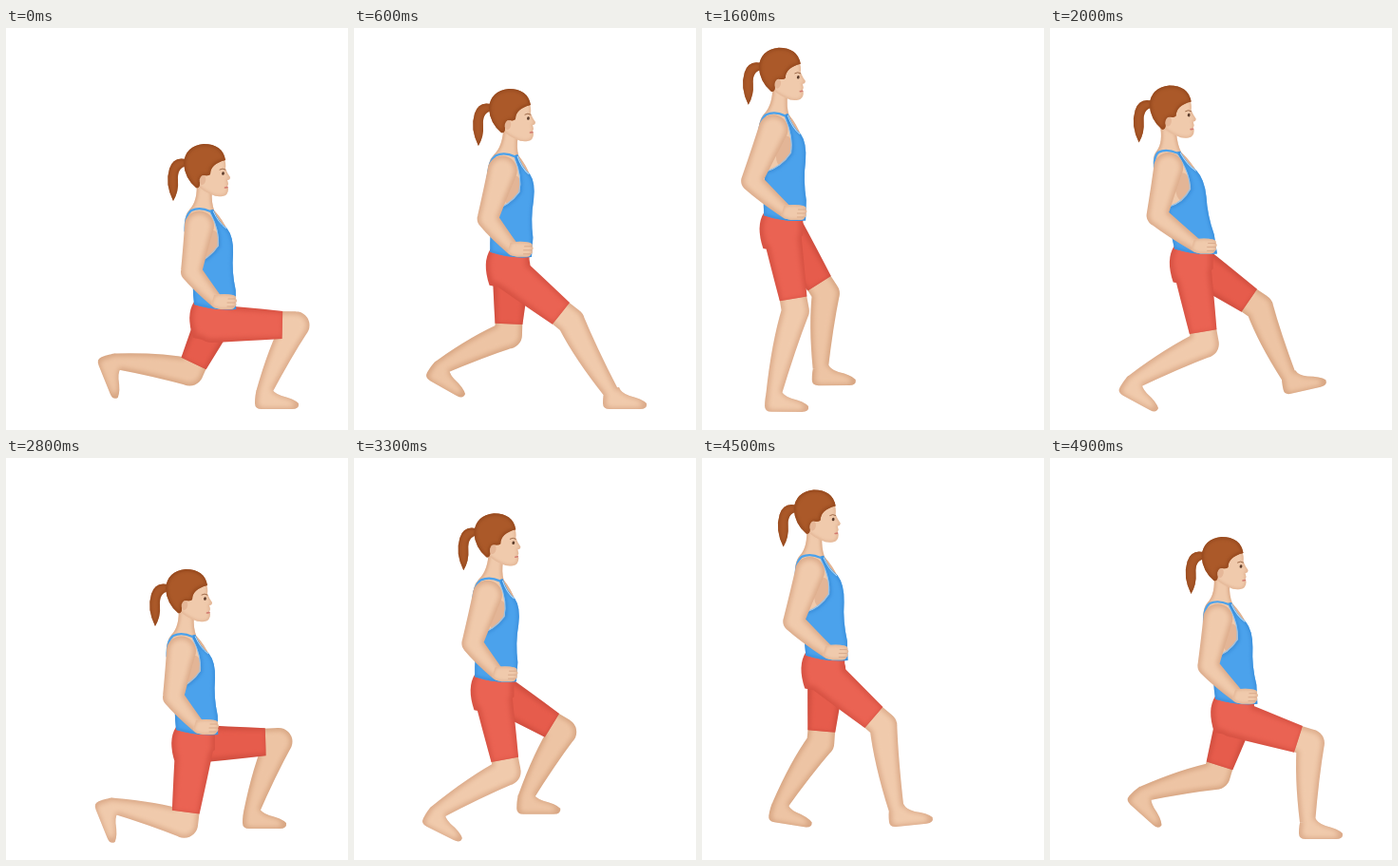
These frames come from a looping animation (360x423 px, 5 s). An HTML page with a canvas:

```html
<!DOCTYPE html>
<html lang="en">
<head>
<meta charset="utf-8">
<title>Alternating lunges</title>
<style>
html, body { margin: 0; width: 100%; height: 100%; overflow: hidden; background: #fff; }
canvas { display: block; width: 360px; height: 423px; }
</style>
</head>
<body>
<canvas id="stage"></canvas>
<script>
const LOOP = 5000, STEP = 100, WIDTH = 360, HEIGHT = 423;
const canvas = document.getElementById('stage');
const ratio = window.devicePixelRatio || 1;
canvas.width = WIDTH * ratio;
canvas.height = HEIGHT * ratio;
const ctx = canvas.getContext('2d');

const SKIN = ['#f0caac', '#dcab8a'], FAR_SKIN = ['#edc4a4', '#d8a683'];
const RED = ['#ea6353', '#d75243'], FAR_RED = ['#e65c4c', '#cf4d3e'];
const BLUE = ['#4ba2ec', '#3c90dc'], HAIR = ['#ab5929', '#96491e'];

const STAND = [80, 20];
const TOES = { near: [109, 403], far: [112, 388] };

// Each lunge: times of step, sink, push-off and rise, and where it ends up
const LUNGES = [
  { lead: 'far', out: [1360, 2080], back: [3050, 3600],
    dropX: [1550, 2560], dropY: [1550, 2560], riseX: [2900, 3850], riseY: [2900, 3600],
    deep: [189, 117], plant: [258, 373], lean: 19 },
  { lead: 'near', out: [4000, 4820], back: [650, 1130],
    dropX: [4080, 5250], dropY: [4240, 5380], riseX: [0, 1500], riseY: [0, 1100],
    deep: [208, 122], plant: [271, 384], lean: 7 }
];

const phase = (t, [a, b]) => Math.min(1, Math.max(0, (t - a) / (b - a)));
const ease = (t, span) => { const p = phase(t, span); return p * p * (3 - 2 * p); };
const lerp = (a, b, f) => a + (b - a) * f;
const mix = (a, b, f) => [lerp(a[0], b[0], f), lerp(a[1], b[1], f)];

// 0 to 1 and back; a lunge that spans the loop point begins at 1
const amount = (t, up, down) => (down[0] < up[0] ? 1 : 0) + ease(t, up) - ease(t, down);

function leadFoot(lunge, t) {
  const [x, y] = TOES[lunge.lead], going = phase(t, lunge.out), coming = phase(t, lunge.back);
  const [ax, ay] = mix([x - 34, y - 16], lunge.plant, amount(t, lunge.out, lunge.back));
  const lift = Math.sin(Math.PI * going) + Math.sin(Math.PI * coming);
  return { ankle: [ax, ay - 15 * lift], angle: -14 * Math.sin(Math.PI * going ** 4) };
}

// The rear foot rolls up over its planted toes
function rearFoot([x, y], angle) {
  const a = angle * Math.PI / 180, c = Math.cos(a), s = Math.sin(a);
  return { ankle: [x - 34 * c + 16 * s, y - 34 * s - 16 * c], angle };
}

function pose(t) {
  const lunge = LUNGES[t > 1340 && t < 3900 ? 0 : 1];
  const sx = amount(t, lunge.dropX, lunge.riseX), sy = amount(t, lunge.dropY, lunge.riseY);
  const rising = t >= lunge.riseX[0] && t < lunge.riseX[1];
  const lean = (rising ? -8 : lunge.lean) * 4 * sx * (1 - sx);
  const head = [lerp(STAND[0], lunge.deep[0], sx), lerp(STAND[1], lunge.deep[1], sy)];
  const nearLeads = lunge.lead === 'near';
  const front = leadFoot(lunge, t), rear = rearFoot(TOES[nearLeads ? 'far' : 'near'], 68 * sy);
  return {
    head,
    hand: [28 + 6 * sx + lean, 174 - 8 * Math.sqrt(sy)],
    elbow: -40 + 16 * sx + lean / 2,
    near: { ...(nearLeads ? front : rear),
      thigh: lerp(82, nearLeads ? 88 : 80, sy), shin: lerp(92, 79, sy) },
    far: { ...(nearLeads ? rear : front),
      thigh: lerp(80, nearLeads ? 62 : 86, sy), shin: 80 }
  };
}

function solveKnee(hip, ankle, thigh, shin) {
  const dx = ankle[0] - hip[0], dy = ankle[1] - hip[1], d = Math.hypot(dx, dy);
  if (d >= thigh + shin) return mix(hip, ankle, thigh / (thigh + shin));
  const along = (thigh * thigh - shin * shin + d * d) / (2 * d);
  const out = Math.sqrt(Math.max(0, thigh * thigh - along * along));
  return [hip[0] + (dx * along + dy * out) / d, hip[1] + (dy * along - dx * out) / d];
}

// Tapered limb; front and back set the swell of each side
function limb(path, a, b, ra, rb, front = (ra + rb) / 2, back = front, cap = true) {
  const d = Math.hypot(b[0] - a[0], b[1] - a[1]) || 1;
  const nx = -(b[1] - a[1]) / d, ny = (b[0] - a[0]) / d, m = mix(a, b, 0.42);
  const at = (p, r) => [p[0] + nx * r, p[1] + ny * r];
  path.moveTo(...at(a, -ra));
  path.quadraticCurveTo(...at(m, -front), ...at(b, -rb));
  path.lineTo(...at(b, rb));
  path.quadraticCurveTo(...at(m, back), ...at(a, ra));
  path.closePath();
  for (const [p, r] of cap ? [[a, ra], [b, rb]] : [[a, ra]]) {
    path.moveTo(p[0] + r, p[1]);
    path.arc(p[0], p[1], r, 0, Math.PI * 2);
  }
}

// Body tone melting into a darker rim
function softInset(build, [body, rim], inset) {
  const outer = build(0);
  ctx.save();
  ctx.fillStyle = rim;
  ctx.fill(outer);
  ctx.clip(outer);
  ctx.filter = `blur(${2.5 * ratio}px)`;
  ctx.fillStyle = body;
  ctx.fill(build(inset));
  ctx.restore();
}

function softRim(path, [body, rim], width) {
  ctx.save();
  ctx.fillStyle = body;
  ctx.fill(path);
  ctx.clip(path);
  ctx.filter = `blur(${1.5 * ratio}px)`;
  ctx.strokeStyle = rim;
  ctx.lineWidth = width;
  ctx.stroke(path);
  ctx.restore();
}

function line(d, color, width) {
  ctx.strokeStyle = color;
  ctx.lineWidth = width;
  ctx.lineCap = 'round';
  ctx.stroke(new Path2D(d));
}

function dot(x, y, rx, ry, color) {
  ctx.fillStyle = color;
  ctx.beginPath();
  ctx.ellipse(x, y, rx, ry, 0.2, 0, Math.PI * 2);
  ctx.fill();
}

const foot = new Path2D('M8-6Q10 0 19 3Q32 6 37 11Q38 17 30 17L-2 17Q-9 17-9 11Q-9 2-7-4Z');
const neck = new Path2D('M-7 40Q-6 60-15 69Q-22 76-20 94L-12 130L20 118L25 92Q20 80 11 70Q8 62 9 50Z');
const face = new Path2D('M8 10L21 13Q24 20 23 26Q25 31 28 35Q28 38 25 38L26 42L25 45L26 47Q26 54 20 55Q13 56 8 53Q0 50-6 44L-6 28Z');
const hair = new Path2D('M23 17Q20 0 0 0Q-19 2-21 20Q-20 36-8 46Q-5 47-4 43Q-5 35 1 33Q5 34 7 32Q7 21 23 17Z');
const tail = new Path2D('M-19 16Q-32 13-36 26Q-41 42-32 60Q-26 50-27 38Q-28 25-18 23Z');
const vest = new Path2D('M6 70L10 69Q15 82 24 89Q31 98 30 116Q28 135 32 155L32 175Q10 177-12 170Q-14 150-12 127Q5 123 15 108Q17 92 6 70Z');

// Waist to seat, hanging from the hand's position
function pelvis(path, [x, y], i) {
  path.moveTo(x - 3 - i, y + 4);
  path.lineTo(x - 3 - i, y + 24);
  path.lineTo(x - 25, y + 42 - i);
  path.lineTo(x - 45 + i, y + 38 - i);
  path.quadraticCurveTo(x - 53 + i, y + 14, x - 44 + i, y);
  path.closePath();
}

function drawLeg(hip, { ankle, angle, thigh, shin }, skin, red, waist) {
  const knee = solveKnee(hip, ankle, thigh, shin);
  softInset(i => {
    const p = new Path2D();
    limb(p, mix(hip, knee, 0.6), knee, 14 - i, 14.5 - i);
    limb(p, knee, ankle, 14.5 - i, 8 - i, 10 - i, 16 - i);
    p.addPath(foot, new DOMMatrix().translate(...ankle).rotate(angle)
      .translate(10, 8).scale(1 - i * 0.06).translate(-10, -8));
    return p;
  }, skin, 3);
  softInset(i => {
    const p = new Path2D();
    limb(p, hip, mix(hip, knee, 0.84), 20 - i, 14.5 - i / 2, 18 - i, 18 - i, false);
    if (waist) pelvis(p, waist, i);
    return p;
  }, red, 4);
}

function drawTorso([x, y], [dx, dy]) {
  const shear = (dx - 32) / 107, stretch = (dy - 60) / 107;
  ctx.save();
  ctx.translate(x, y);
  ctx.transform(1, 0, shear, stretch, -60 * shear, 60 - 60 * stretch);
  softRim(neck, SKIN, 4);
  dot(7, 106, 8, 15, '#e3b596');
  softRim(vest, BLUE, 4);
  line('M7 71Q-4 66-13 70Q-20 75-20 92', BLUE[0], 2.2);
  line('M10 71Q15 83 23 89', '#b9dcf6', 1);
  line('M7 73Q17 93 14 108Q5 121-10 126', '#8fc4f1', 1);
  ctx.restore();
}

function drawArm([x, y], [dx, dy], ex) {
  const tip = [x + dx, y + dy], wrist = [tip[0] - 20, tip[1]];
  const shoulder = [x - 5 + (dx - 32) * 0.24, y + 86];
  const elbow = [x + ex + 11, y + dy * 0.81];
  softInset(i => {
    const p = new Path2D();
    limb(p, shoulder, elbow, 15.5 - i, 11 - i);
    limb(p, elbow, wrist, 11 - i, 7 - i, 9 - i, 11 - i);
    return p;
  }, SKIN, 3);
  ctx.save();
  ctx.translate(...tip);
  softRim(new Path2D('M-23-7Q-12-9-3-7Q1-6 0-3Q2-1 0 1Q1 4-1 5Q-2 8-6 8L-16 8Q-23 7-26 3Z'), SKIN, 2);
  line('M-8-3L-1-3M-9 1L-1 1M-9 5L-2 5', '#d3a285', 0.8);
  ctx.restore();
}

function drawHead([x, y]) {
  ctx.save();
  ctx.translate(x, y);
  softRim(tail, HAIR, 3);
  softRim(face, SKIN, 2);
  softRim(hair, HAIR, 4);
  dot(-1, 38, 3.2, 5, '#e5b798');
  line('M17 27Q20 25 23 27', '#96603f', 0.9);
  dot(20.5, 31, 1.4, 1.8, '#5d3d2c');
  line('M22.5 46L25 45.6', '#d27a70', 1.6);
  ctx.restore();
}

function draw(t) {
  const p = pose(t), [wx, wy] = [p.head[0] + p.hand[0], p.head[1] + p.hand[1]];
  ctx.setTransform(ratio, 0, 0, ratio, 0, 0);
  ctx.fillStyle = '#fff';
  ctx.fillRect(0, 0, WIDTH, HEIGHT);
  drawLeg([wx - 22, wy + 18], p.far, FAR_SKIN, FAR_RED);
  drawLeg([wx - 25, wy + 23], p.near, SKIN, RED, [wx, wy]);
  drawTorso(p.head, p.hand);
  drawArm(p.head, p.hand, p.elbow);
  drawHead(p.head);
}

const start = performance.now();
let shown = -1;
function tick() {
  const elapsed = Math.max(0, performance.now() - start) % LOOP;
  const t = Math.floor(elapsed / STEP) * STEP;
  if (t !== shown) draw(shown = t);
  requestAnimationFrame(tick);
}
tick();
</script>
</body>
</html>
```
